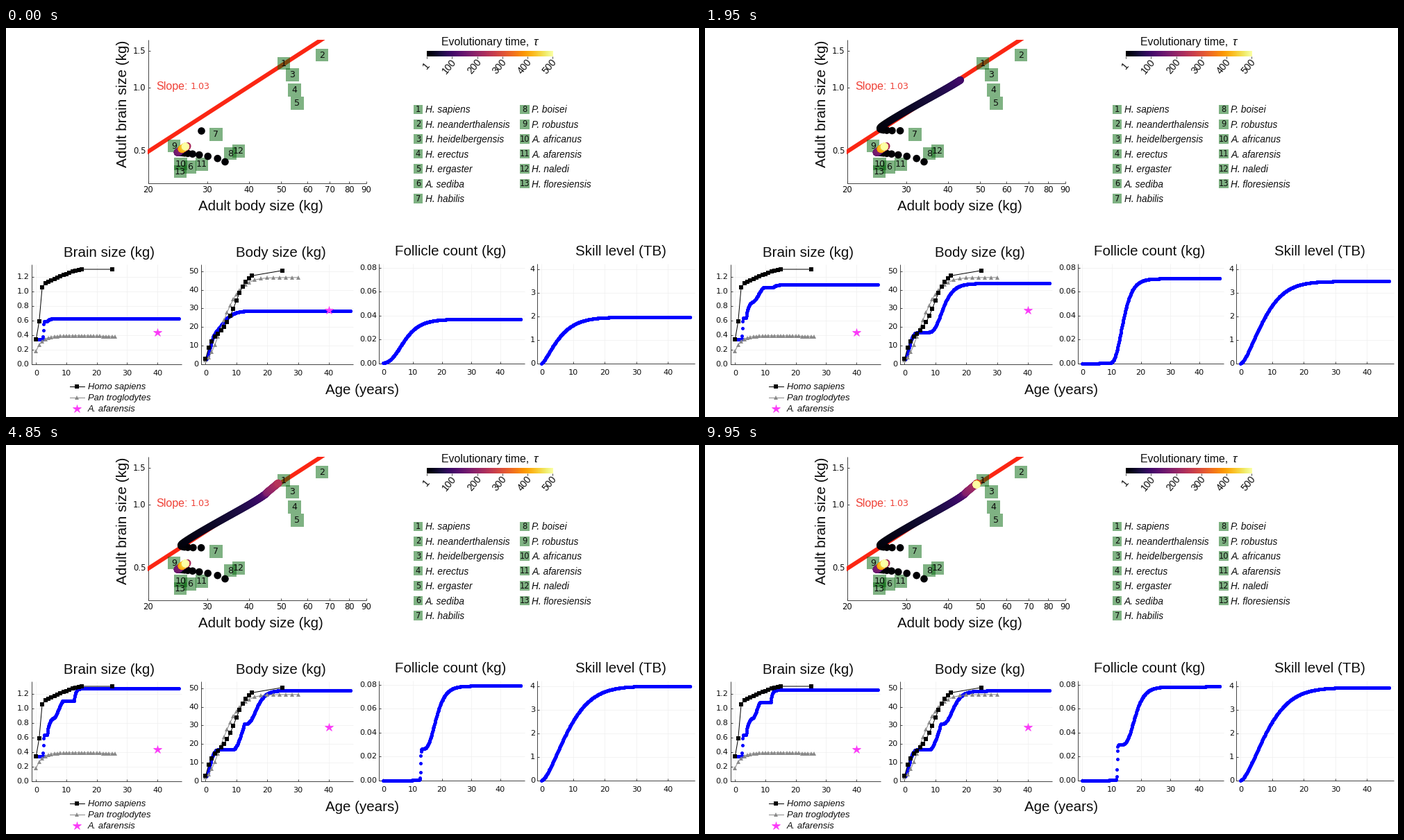
Recreate the animation shown at these times as a matplotlib script. Size 998 by 561 pixels, loop 10 s.

```python
import numpy as np
import matplotlib as mpl
import matplotlib.pyplot as plt
from matplotlib.animation import FuncAnimation
from matplotlib.patches import Rectangle

W, H, DPI = 998, 561, 72  # at 72 dpi one point is one pixel
FRAMES, INTERVAL, STEPS = 200, 50, 500
SANS, DIGITS = "Liberation Sans", "DejaVu Sans"
GREEN = (0, 0.4, 0.03, 0.5)
MAGENTA = "#fb38f8"
GRAY = "#8a8a8a"
AGES = np.arange(0, 47.05, 0.1)
TAU = np.arange(1, STEPS + 1)

fig = plt.figure(figsize=(W / DPI, H / DPI), dpi=DPI, facecolor="white")
ax = fig.add_axes([0, 0, 1, 1])
ax.axis("off")


# Growth shapes, each rising from 0 to 1
def ramp(a, start, end):
    return np.clip((a - start) / (end - start), 0, 1)


def ease(a, start, end):
    t = ramp(a, start, end)
    return t * t * (3 - 2 * t)


def saturate(a, start, width, power=1):
    return 1 - np.exp(-(np.maximum(a - start, 0) / width) ** power)


def logistic(a, centre, width):
    return 0.5 + 0.5 * np.tanh((a - centre) / (2 * width))


def gompertz(a, centre, width):
    return np.exp(-np.exp((centre - a) / width))


# Evolution: first expansion, second expansion, then slightly earlier growth
def brain_spread(tau):
    return saturate(tau, 1, 59, 1.54)


def body_spread(tau):
    return saturate(tau, 1, 57.5, 1.7)


def second(tau):
    return ease(tau, 168, 244)


def earlier(tau):
    return saturate(tau, 243, 100)


def adult_brain(tau):
    return 0.625 + 0.525 * brain_spread(tau) + 0.12 * second(tau) - 0.022 * earlier(tau)


def adult_body(tau):
    return (24.3 + 21.1 * body_spread(tau) + 4.5 * np.exp((1 - tau) / 2.3)
            + 3.6 * second(tau) - 0.3 * earlier(tau))


def spurt_age(tau):
    return 12.55 - 0.9 * earlier(tau)


def brain_curve(a, tau):
    q, e = second(tau), earlier(tau)
    total = adult_brain(tau) - 0.338
    jump = min(0.297, 0.87 * total)
    rest = total - jump
    child = min(rest, 0.25 * (1 - np.exp(-rest / 0.18)))
    late = 0.04 * brain_spread(tau) + 0.125 * q
    return (0.338 + jump * logistic(a, 2.4, 0.06)
            + child * saturate(a, 3.6, 0.75)
            + (rest - child - late) * ease(a, 5.8, 9.7 - 0.6 * q - 0.7 * e)
            + late * saturate(a, spurt_age(tau), 1 - 0.55 * q))


def body_curve(a, tau):
    g, q, spurt = body_spread(tau), second(tau), spurt_age(tau)
    first = 13.6 * q
    centre = (1 - q) * (5.3 + 7.2 * g ** 1.3) + q * (spurt + 3.5)
    width = 2 + 2.4 * g * (1 - g) - 0.2 * q
    return (2.5 + 14.6 * saturate(a, 0, 1.9, 2)
            + first * ramp(a, spurt - 3.4, spurt) ** 1.5
            + (adult_body(tau) - 17.1 - first) * gompertz(a, centre, width))


def follicle_curve(a, tau):
    g, q, e = body_spread(tau), second(tau), earlier(tau)
    jump = 26 * q + 4 * e
    adult = 37 + 37 * g + 5 * q - 0.8 * e
    centre = (1 - q) * (5.7 + 8 * g ** 0.8) + 17.3 * q
    width = 3.6 - 1.8 * g ** 2 + 0.3 * q
    return (jump * logistic(a, spurt_age(tau) + 0.15, 0.08)
            + (adult - jump) * gompertz(a, centre, width)) / 1000


def skill_curve(a, tau):
    g, q = body_spread(tau), second(tau)
    adult = 1.96 + 1.66 * g + 0.38 * q - 0.07 * earlier(tau)
    return adult * saturate(a, 0, 6.5 + 2.4 * g + 1.1 * q, 1.3 + 0.2 * g)


# Drawing helpers
def label(x, y, s, size, font=SANS, ha="center", va="baseline", **kw):
    kw = {"color": "#0c0c0c", "zorder": 8, **kw}
    ax.text(x, y, s, fontsize=size, fontfamily=font, ha=ha, va=va, **kw)


def rule(xs, ys, color="#333333", lw=0.9, z=1.5):
    ax.plot(xs, ys, color=color, lw=lw, zorder=z, solid_capstyle="butt")


def square(x, y, size):
    ax.add_patch(Rectangle((x - size / 2, y - size / 2), size, size,
                           fc=GREEN, ec="none", zorder=4))


def star(x, y):
    ax.plot(x, y, "*", ms=12.5, mew=0.7, color=MAGENTA, zorder=6)


def dots(points, colors):
    return ax.scatter(points[:, 0], points[:, 1], s=10.6 ** 2, c=colors,
                      linewidths=0, zorder=5)


class Panel:
    """Lower chart: maps age and value to pixels and draws its own frame."""

    def __init__(self, growth, left, right, x0, dx, y0, dy, top, yticks, fmt):
        self.growth = growth
        self.x0, self.dx, self.y0, self.dy = x0, dx, y0, dy
        rule([left, left, right], [top, y0, y0])
        for v in yticks:
            y = self.y(v)
            rule([left, right], [y, y], "#f0f0f0", 0.8, 1)
            rule([left, left + 3], [y, y])
            label(left - 3.5, y, format(v, fmt), 11.2, DIGITS, "right", "center")
        for a in range(0, 41, 10):
            x = self.x(a)
            rule([x, x], [top, y0], "#f0f0f0", 0.8, 1)
            rule([x, x], [y0, y0 - 3])
            label(x, y0 + 13.3, str(a), 11.2, DIGITS, va="center")
        self.curve, = ax.plot([], [], "o", ms=5, mew=0, color="#0000ff", zorder=2)

    def x(self, a):
        return self.x0 + self.dx * np.asarray(a)

    def y(self, v):
        return self.y0 - self.dy * np.asarray(v)

    def series(self, a, v, marker, color, size):
        ax.plot(self.x(a), self.y(v), marker=marker, ms=size, mew=0, lw=1,
                color=color, zorder=3)

    def show(self, tau):
        self.curve.set_data(self.x(AGES), self.y(self.growth(AGES, tau)))


# Upper chart, logarithmic on both axes
def body_x(v):
    return 205 + 208.7 * np.log(v / 20)


def brain_y(v):
    return 177.5 - 131.3 * np.log(v / 0.5)


rule([205, 205, 519], [17, 224, 224])
for v in range(20, 91, 10):
    rule([body_x(v)] * 2, [224, 221])
    label(body_x(v), 233.5, str(v), 11.6, DIGITS, va="center")
for v in (0.5, 1.0, 1.5):
    rule([205, 208], [brain_y(v)] * 2)
    label(201.5, brain_y(v), str(v), 11.6, DIGITS, "right", "center")
trend, = ax.plot([195, 470], [184.5, 6.7], color="#fb2613", lw=6, zorder=3)
trend.set_clip_path(Rectangle((204.5, 16.5), 315, 208, transform=ax.transData))
label(216, 88.5, "Slope:", 16, ha="left", color="#ef4036")
label(266, 88, "1.03", 12.6, DIGITS, "left", color="#ef4036")
label(366.5, 263, "Adult body size (kg)", 20.5)
label(178.5, 109, "Adult brain size (kg)", 20.7, ha="right", va="center", rotation=90)

SPECIES = [("H. sapiens", 400, 51), ("H. neanderthalensis", 455, 39),
           ("H. heidelbergensis", 412.5, 67.5), ("H. erectus", 415.5, 89.5),
           ("H. ergaster", 419.5, 108.5), ("A. sediba", 265, 200.5),
           ("H. habilis", 302.5, 153.5), ("P. boisei", 323, 181),
           ("P. robustus", 242, 170), ("A. africanus", 251.5, 196),
           ("A. afarensis", 282, 196.5), ("H. naledi", 335, 177.5),
           ("H. floresiensis", 251, 207)]
for n, (name, x, y) in enumerate(SPECIES):
    square(x, y, 18.5)
    label(x, y, str(n + 1), 12.6, DIGITS, va="center")
    col, row = divmod(n, 7)
    x, y = 593.5 + 153.5 * col, 117.3 + 21.45 * row
    square(x, y, 13.5)
    label(x, y, str(n + 1), 11.5, DIGITS, va="center")
    label(x + 10.5, y + 5, name, 13.6, ha="left", style="italic")

COLORS = mpl.colormaps["inferno"]((TAU - 1) / (STEPS - 1))
main_path = np.column_stack([body_x(adult_body(TAU)), brain_y(adult_brain(TAU))])
# The lower trail decays to one spot, then wanders a little around it
turns = [15, 150, 220, 330, 400, 440, 500]
side_path = np.column_stack([
    250 + 65.5 * np.exp(-((TAU - 1) / 3.4) ** 1.4)
    + np.interp(TAU, turns, [0, -3, 11, 3, 3.5, 8, 8.5]),
    179.3 + 13.7 * np.exp((1 - TAU) / 2.3)
    + np.interp(TAU, turns, [0, 0, -9, -5, -5, -8, -8.5])])
dots(side_path, COLORS)
trail = dots(main_path, COLORS)

# Colour scale
label(627.5, 25, "Evolutionary time,", 15.9, ha="left")
label(759, 25, "τ", 17, ha="left", style="italic")
ax.imshow(np.linspace(0, 1, 256)[None], cmap="inferno", aspect="auto",
          extent=(606, 788, 40.5, 33), zorder=2)
for n in range(6):
    x = 606 + 36.3 * n
    rule([x, x], [40.5, 43.5])
    label(x - (4.2 if n else 0.5), 55.5 if n else 54, str(100 * n or 1), 14,
          va="center", rotation=50)

# Lower charts
brain = Panel(brain_curve, 37, 253, 43.4, 4.37, 484.5, 105, 341,
              np.arange(0, 1.3, 0.2), ".1f")
body = Panel(body_curve, 281, 500, 287.4, 4.44, 484.5, 2.67, 341,
             range(0, 51, 10), "d")
follicle = Panel(follicle_curve, 537.5, 747, 543.5, 4.21, 483.5, 1725, 340,
                 np.arange(0, 0.09, 0.02), ".2f")
skill = Panel(skill_curve, 765.5, 992, 771.5, 4.55, 483.5, 34, 340, range(5), "d")
panels = [brain, body, follicle, skill]
label(149, 330, "Brain size (kg)", 20.5)
label(396, 330, "Body size (kg)", 20.5)
label(640.5, 328, "Follicle count (kg)", 20.5)
label(885, 328, "Skill level (TB)", 20.5)
label(513.5, 528, "Age (years)", 20.5)

# Reference species
ape = np.arange(27)
brain.series(ape, 0.375 - 0.195 * np.exp(-ape / 1.8) + 0.012 * np.sin(np.pi * ape / 26),
             "^", GRAY, 5.5)
ape = np.append(np.arange(15), np.arange(16, 31, 2))
body.series(ape, 2 + 44.7 * saturate(ape, 0, 7.6, 1.7), "^", GRAY, 5.5)
human = np.append(np.arange(16), 25)
grown = 1.105 + 0.195 * (1 - (1 - ramp(human[3:], 3, 15)) ** 1.3)
brain.series(human, [0.338, 0.585, 1.057, *grown], "s", "black", 5.2)
body.series(human, 2.5 + 13.5 * saturate(human, 0, 1.8)
            + 32 * logistic(human, 9.7, 1.9) + 0.1 * human, "s", "black", 5.2)
star(brain.x(40), brain.y(0.433))
star(body.x(40), body.y(29.1))

for y, name, marker, color in [(516.5, "Homo sapiens", "s", "black"),
                               (532.5, "Pan troglodytes", "^", GRAY)]:
    ax.plot([92, 102.3, 113], [y] * 3, color=color, lw=1, marker=marker,
            markevery=[1], ms=6, mew=0)
    label(118, y + 4.5, name, 13, ha="left", style="italic")
star(102.3, 548.7)
label(118, 553.2, "A. afarensis", 13, ha="left", style="italic")

ax.set(xlim=(0, W), ylim=(H, 0), aspect="auto")


def draw(i):
    tau = 1 + i * (STEPS - 1) / (FRAMES - 1)
    n = round(tau)
    trail.set_offsets(main_path[:n])
    trail.set_facecolor(COLORS[:n])
    for panel in panels:
        panel.show(tau)
    return [trail, *(p.curve for p in panels)]


anim = FuncAnimation(fig, draw, frames=FRAMES, interval=INTERVAL, repeat=True)
plt.show()
```
